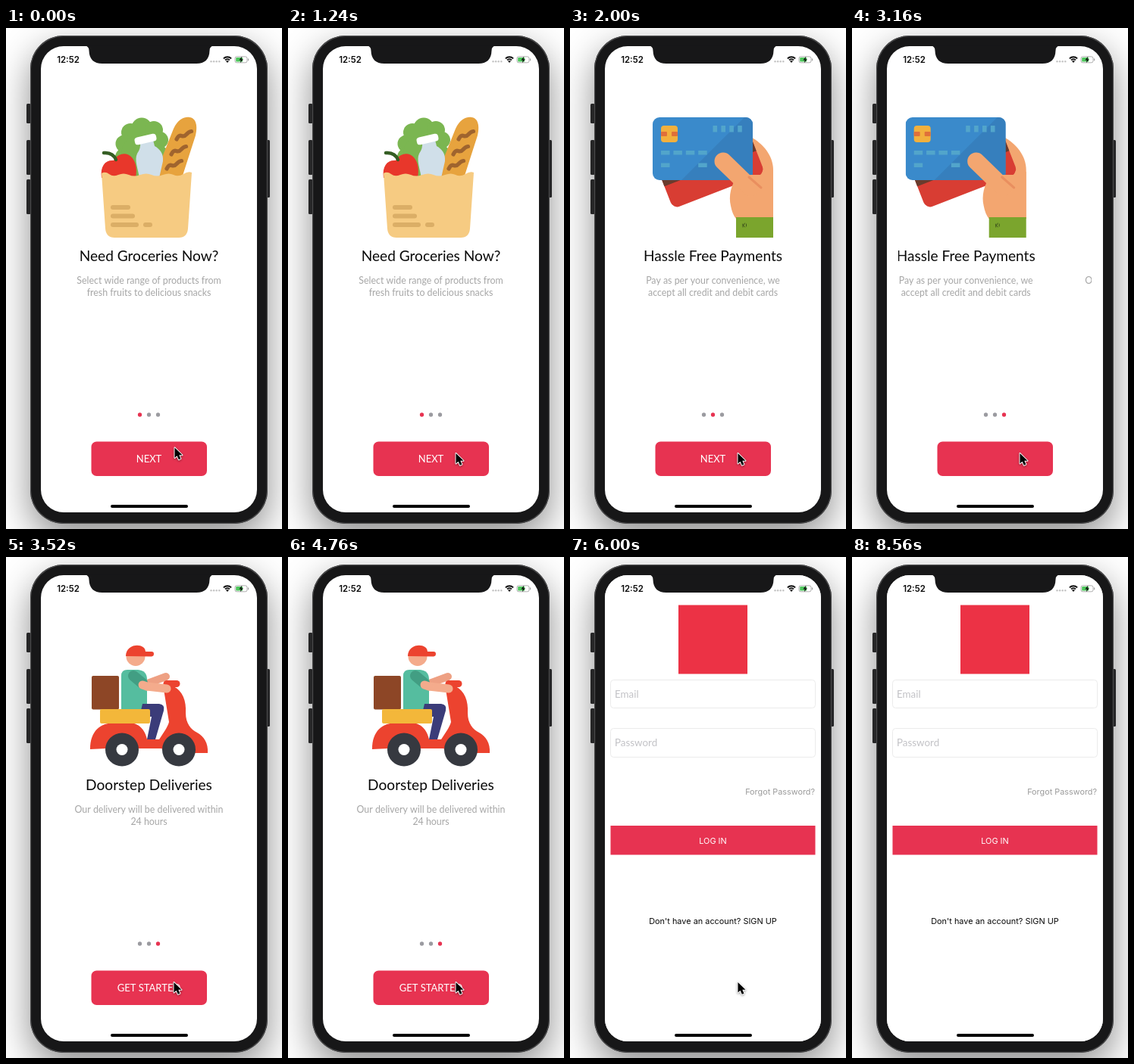
These frames come from a looping animation (364 by 662 pixels, 8600 ms). An HTML page with a canvas:

```html
<!DOCTYPE html>
<html lang="en">
<head>
<meta charset="utf-8">
<title>Grocery onboarding</title>
<style>
html, body { margin: 0; width: 100%; height: 100%; overflow: hidden; background: #fff; }
canvas { display: block; width: 364px; height: 662px; }
</style>
</head>
<body>
<canvas id="stage"></canvas>
<script>
const W = 364, H = 662, LOOP = 8600, PAGE = 255, MID = 188.5;
const ROSE = '#e73351', GREY = '#9b9ba0';
const BODY = 'Lato, "Open Sans", sans-serif';
const SYS = 'Inter, "Liberation Sans", sans-serif';
const cv = document.getElementById('stage');
const c = cv.getContext('2d');
const dpr = window.devicePixelRatio || 1;
cv.width = W * dpr;
cv.height = H * dpr;

const clamp = v => Math.max(0, Math.min(1, v));
const span = (t, a, b) => clamp((t - a) / (b - a));
const inOut = p => (1 - Math.cos(Math.PI * p)) / 2;
const out = p => 1 - Math.pow(1 - p, 4);

function box(x, y, w, h, color, r = 0) {
  c.beginPath();
  c.roundRect(x, y, w, h, r);
  c.fillStyle = color;
  c.fill();
}
function disc(x, y, r, color) {
  c.beginPath();
  c.arc(x, y, r, 0, 7);
  c.fillStyle = color;
  c.fill();
}
function shape(d, color) {
  c.fillStyle = color;
  c.fill(new Path2D(d));
}
function line(d, color, width, cap = 'round') {
  c.strokeStyle = color;
  c.lineWidth = width;
  c.lineCap = cap;
  c.lineJoin = 'round';
  c.stroke(new Path2D(d));
}
function text(s, x, y, size, color, family = BODY, align = 'center', weight = 400) {
  c.font = `${weight} ${size}px ${family}`;
  c.textAlign = align;
  c.fillStyle = color;
  c.fillText(s, x, y);
}
function layer(fn) {
  c.save();
  fn();
  c.restore();
}

function drawBag() {
  // lettuce
  for (const [x, y, r] of [[179, 132, 13.5], [164, 138, 12], [195, 135, 12], [156, 153, 11.5],
    [203, 148, 11], [157, 171, 13], [200, 168, 14], [178, 166, 26], [172, 182, 18]])
    disc(x, y, r, '#7bb651');
  // bread
  shape('M195 198 L221 133 C227 120 236 117 242 118 C251 119 253 130 250 142 L232 198 Z', '#e7a33e');
  for (const [x, y] of [[225, 147], [218, 167], [212, 186]])
    line(`M${x} ${y} q3 -6 6.5 -4.5 t6.5 -2 t6.5 -4`, '#9f642e', 5.2);
  // bottle
  shape('M177 151 L194 148 L196 156 C203 160 208 166 207 176 L202 198 H176 C174 186 169 174 173 166 Q178 159 177 151 Z', '#d0dfe9');
  layer(() => {
    c.translate(184, 147);
    c.rotate(-.22);
    box(-14.5, -5, 29, 10, '#fff', 4);
  });
  // tomato
  shape('M126 198 C124 182 131 174 142 175 C149 164 160 164 166 171 C172 178 173 188 171 198 Z', '#e8372b');
  line('M129 165 Q141 164 145 174', '#355e24', 4.5);
  // paper bag
  shape('M126 192 Q131 189 136 193 T148 194 T162 194 T177 194 T192 194 T207 194 T221 194 T234 193 Q240 189 245 191 L240 265 Q239 277 228 277 H143 Q132 277 131 265 Z', '#f6cb82');
  for (const [x, y, w] of [[138, 234, 26], [138, 245.5, 32], [138, 257, 37], [181, 257, 12]])
    box(x, y, w, 6, '#dbae66', 3);
}

function drawCards() {
  const skin = '#f3a670';
  shape('M238 144 C254 152 268 168 268 188 V252 H219 V200 Z', skin);
  // rear card
  layer(() => {
    c.translate(136, 239);
    c.rotate(-.37);
    box(0, -74, 130, 74, '#d83d33', 9);
    box(0, -46, 130, 14, '#693b2d');
  });
  // front card
  layer(() => {
    c.beginPath();
    c.roundRect(109, 118, 132, 83, 9);
    c.clip();
    box(109, 118, 132, 83, '#3a8acb');
    shape('M147 201 L230 118 H241 V201 Z', '#367fbd');
  });
  box(120, 129, 22, 22, '#f2b03d', 4);
  box(120, 137, 8, 6, '#e0703a', 1);
  box(134, 137, 8, 6, '#e0703a', 1);
  const mark = '#52a5cb';
  for (let i = 0; i < 4; i++) {
    box(188.5 + i * 10.9, 129, 5.6, 8.5, mark);
    box(120 + i * 16.4, 162, 11.5, 5.5, mark);
  }
  box(120, 178.5, 11.5, 5.5, mark);
  box(169.2, 178.5, 11.5, 5.5, mark);
  // thumb and palm
  shape('M222 194 C212 207 209 222 212 235 Q214 246 219 252 H268 V190 L256 184 L252 194 Z', skin);
  line('M202 176 L238 211', skin, 23);
  line('M236 197 L252 211', '#e98f5f', 3);
  box(219, 250, 49, 27, '#7ba52d');
  line('M228 259 v4 m0 -3 l2.5 3 m0 -5 l-1 2 m3 -1 v3', '#33441b', .8);
}

function drawScooter() {
  const red = '#ec432f', skin = '#f4ab8c';
  // rider
  disc(171, 131.5, 12.5, skin);
  shape('M158 131 C158 113 184 113 184 125 H192 Q195 125 195 128 T192 131.5 Z', red);
  line('M184 168 L211 158', '#eea083', 10);
  shape('M152 202 V157 Q152 149 160 149 H174 Q186 150 186 162 V202 Z', '#55bd9f');
  // legs
  shape('M180 194 H202 Q210 195 208 203 L197 241 H186 L192 211 H176 Z', '#3b3c79');
  // cargo
  box(113, 157, 36, 44.5, '#8d4626', 2);
  // chassis
  shape('M111 254 C111 230 124 219 144 219 H163 C178 220 184 231 186 241 H202 C208 232 213 225 215 218 L209 181 C207 171 214 167 221 171 C233 177 238 190 237 206 C237 220 244 228 252 232 C261 237 267 246 266 259 H247 L209 255 Q206 254 205 253 H175 L132 253 Z', red);
  box(124, 201, 66, 19, '#f3b73a', 2);
  line('M212 167.5 H225', red, 9);
  line('M186 171 L212 174', skin, 11);
  line('M168 157 L180 167', '#429e83', 14);
  line('M180 169 L186 171', skin, 11);
  for (const x of [153, 228]) {
    disc(x, 254.5, 22, '#363940');
    disc(x, 254.5, 7.5, '#fff');
  }
}

const pages = [
  [drawBag, 'Need Groceries Now?', 'Select wide range of products from', 'fresh fruits to delicious snacks'],
  [drawCards, 'Hassle Free Payments', 'Pay as per your convenience, we', 'accept all credit and debit cards'],
  [drawScooter, 'Doorstep Deliveries', 'Our delivery will be delivered within', '24 hours']
];

function label(t) {
  if (t < 1470) return ['NEXT', 1];
  if (t < 2960) return ['NEXT', t < 1570 ? .2 : .2 + .8 * span(t, 1570, 1970)];
  if (t < 3190) return ['NEXT', .2 * (1 - span(t, 3070, 3140))];
  if (t < 5360) return ['GET STARTED', span(t, 3190, 3430)];
  return ['GET STARTED', .2];
}

function drawIntro(t) {
  const at = inOut(span(t, 1570, 1870)) + inOut(span(t, 3085, 3385));
  layer(() => {
    c.beginPath();
    c.rect(61, 50, PAGE, 440);
    c.clip();
    pages.forEach(([art, title, a, b], i) => {
      if (Math.abs(i - at) >= 1) return;
      layer(() => {
        c.translate((i - at) * PAGE, 0);
        art();
        text(title, MID, 308, 19.1, '#0a0a0a');
        text(a, MID, 338, 12.4, '#a6a6a6');
        text(b, MID, 354, 12.4, '#a6a6a6');
      });
    });
  });
  const active = (t >= 1570) + (t >= 3070);
  for (let i = 0; i < 3; i++) disc(176.5 + 12 * i, 511, 2.65, i === active ? ROSE : GREY);
  box(112.5, 546.5, 152.5, 45.5, ROSE, 7);
  const [s, alpha] = label(t);
  layer(() => {
    c.globalAlpha = alpha;
    text(s, MID, 574, 13, '#fff');
  });
}

function field(y, h, name) {
  c.beginPath();
  c.roundRect(53.5, y + .5, 270, h, 4);
  c.strokeStyle = '#ebebeb';
  c.lineWidth = 1;
  c.stroke();
  text(name, 59, y + 23.5, 13.4, '#c2c2c6', BODY, 'left');
}

function drawLogin(t) {
  const p = out(span(t, 5480, 5900));
  if (!p) return;
  layer(() => {
    c.translate(0, 616 * (1 - p));
    box(46, 24, 285, 616, '#fff');
    box(143, 63.5, 91, 91, '#ec3245');
    field(162, 37, 'Email');
    field(226, 38, 'Password');
    text('Forgot Password?', 323, 314, 10.85, '#9a9a9a', SYS, 'right');
    box(53.5, 355, 270, 38.5, ROSE);
    text('LOG IN', MID, 378.5, 10.9, '#fff', SYS);
    text("Don't have an account? SIGN UP", MID, 485, 10.9, '#0a0a0a', SYS);
  });
}

function drawPhone() {
  box(0, 0, W, H, '#fff');
  layer(() => {
    c.shadowColor = 'rgba(0,0,0,.45)';
    c.shadowBlur = 48 * dpr;
    c.shadowOffsetY = 18 * dpr;
    box(32, 10, 313, 645, '#161617', 44);
  });
  for (const [x, y, h] of [[27, 100, 26], [27, 148, 46], [27, 200, 46], [342.5, 148, 76]])
    box(x, y, 5.5, h, '#262627', 1.5);
  box(32, 10, 313, 645, '#4a4a4b', 44);
  box(33.2, 11.2, 310.6, 642.6, '#171718', 43);
  box(46, 24, 285, 616, '#fff', 30);
}

function drawStatus() {
  shape('M104 23.5 Q109.5 24 109.5 30 Q110 47 127 47 H251 Q268 47 268.5 30 Q268.5 24 274 23.5 Z', '#171718');
  text('12:52', 82, 45.5, 11.4, '#0a0a0a', SYS, 'center', 600);
  for (let i = 0; i < 4; i++) disc(270.5 + 3.6 * i, 44.3, 1.2, '#c4c4c4');
  // wifi
  c.strokeStyle = '#0a0a0a';
  c.lineCap = 'butt';
  c.lineWidth = 1.9;
  for (const r of [4.3, 7.3]) {
    c.beginPath();
    c.arc(292, 45.5, r, -2.35, -.79);
    c.stroke();
  }
  shape('M292 46 L290 43.8 Q292 42.2 294 43.8 Z', '#0a0a0a');
  // battery
  c.beginPath();
  c.roundRect(302, 37.8, 16, 8, 2.3);
  c.strokeStyle = '#a5a5a5';
  c.lineWidth = .9;
  c.stroke();
  box(303.2, 39, 9, 5.6, '#4fc75d', 1.2);
  box(319, 40.3, 1.2, 3, '#a5a5a5', .6);
  shape('M311.3 37.4 L307.4 42.4 H309.7 L308.9 46.3 L312.8 41.2 H310.5 Z', '#111');
  box(138, 630, 102, 4, '#000', 2);
}

function drawCursor(t) {
  if (t >= 8120) return;
  const p = inOut(span(t, 200, 900));
  layer(() => {
    c.translate(222 - p, 554 + 7.5 * p);
    c.scale(.94, .94);
    const arrow = 'M.5 .5 V15 L3.8 12 L6.2 17.4 L9 16.2 L6.7 11 H11.2 Z';
    layer(() => {
      c.shadowColor = 'rgba(0,0,0,.4)';
      c.shadowBlur = 3 * dpr;
      c.shadowOffsetY = dpr;
      line(arrow, '#fff', 2);
    });
    shape(arrow, '#000');
  });
}

function draw(t) {
  c.setTransform(dpr, 0, 0, dpr, 0, 0);
  drawPhone();
  layer(() => {
    c.beginPath();
    c.roundRect(46, 24, 285, 616, 30);
    c.clip();
    drawIntro(t);
    drawLogin(t);
  });
  drawStatus();
  drawCursor(t);
}

const start = performance.now();
function tick() {
  draw((performance.now() - start) % LOOP);
  requestAnimationFrame(tick);
}
tick();
</script>
</body>
</html>
```
